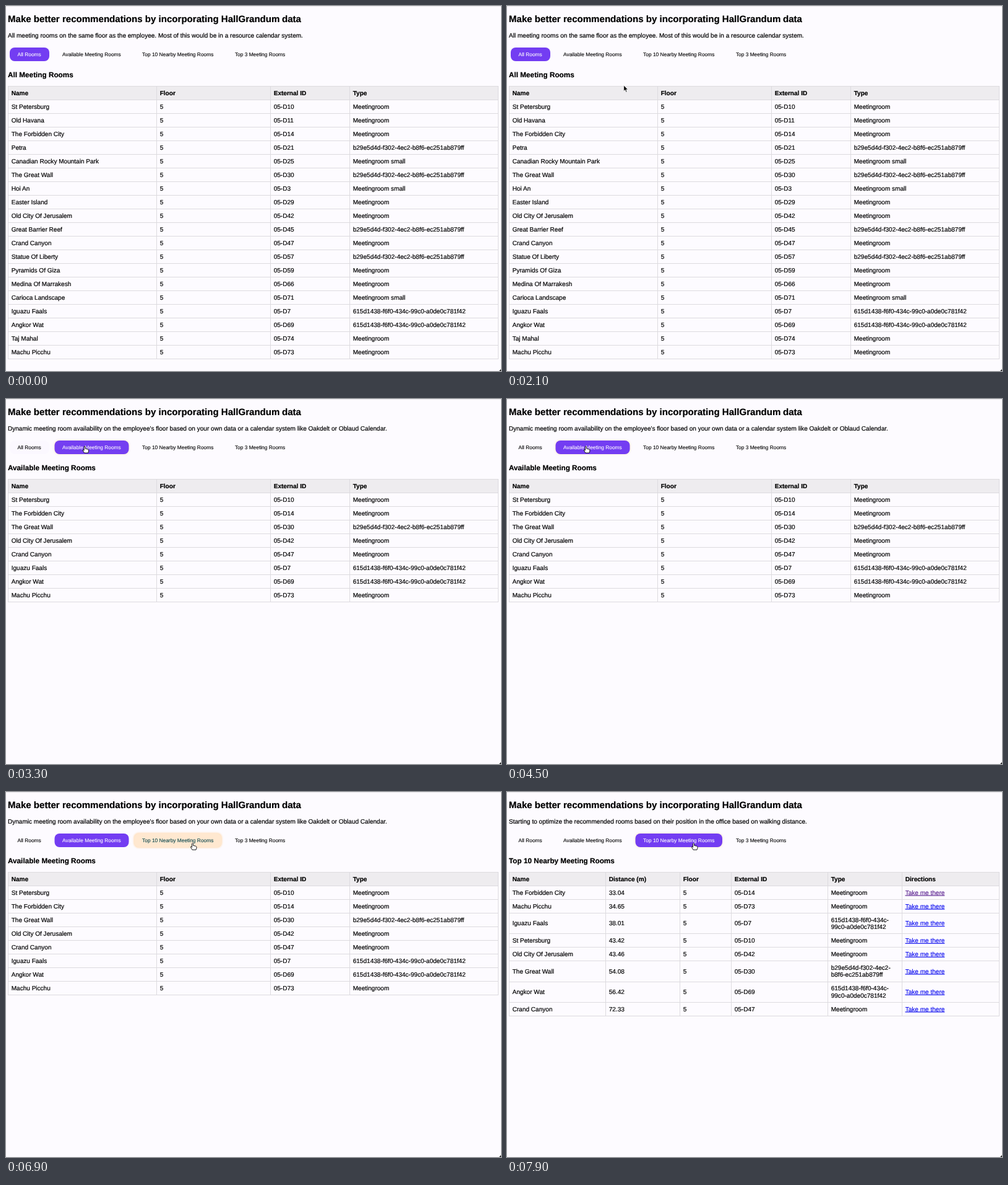
An HTML page for the animation above (8 s loop, 800 by 589 pixels).

```html
<!DOCTYPE html>
<html lang="en">
<head>
<meta charset="utf-8">
<title>Meeting rooms</title>
<style>
  html, body { margin: 0; width: 100%; height: 100%; overflow: hidden; background: #fdfbff; }
  svg { display: block; width: 100%; height: 100%; }
  text {
    font: 10.05px "Liberation Sans", Arial, sans-serif; text-rendering: geometricPrecision; white-space: pre;
    color: #000; fill: currentColor; stroke: currentColor; stroke-width: .2px;
  }
  .title { font-size: 15.07px; font-weight: bold; }
  .heading { font-size: 11.76px; font-weight: bold; }
  .tab { font-size: 8.37px; stroke-width: .12px; }
  .th { font-weight: bold; }
  .link { color: #0000ee; text-decoration: underline; stroke-width: .1px; }
  .visited { color: #551a8b; }
</style>
</head>
<body>
<svg id="stage" viewBox="0 0 800 589">
  <defs>
    <filter id="blur" x="-10%" y="-50%" width="120%" height="200%"><feGaussianBlur stdDeviation="1.6"/></filter>
  </defs>
  <rect width="800" height="589" fill="#fdfbff"/>
  <rect width="800" height="1" fill="#e9e7eb"/>
  <path d="M800 586V589H797Z" fill="#222"/>
  <text class="title" x="3" y="26.2">Make better recommendations by incorporating HallGrandum<tspan x="446">data</tspan></text>
</svg>
<script>
const LOOP = 8000, STEP = 100;
const stage = document.getElementById('stage');

function add(parent, tag, attrs, text) {
  const el = document.createElementNS('http://www.w3.org/2000/svg', tag);
  for (const key in attrs) el.setAttribute(key, attrs[key]);
  if (text !== undefined) el.textContent = text;
  parent.appendChild(el);
  return el;
}

const B = 'b29e5d4d-f302-4ec2-b8f6-ec251ab879ff';
const C = '615d1438-f6f0-434c-99c0-a0de0c781f42';
const M = 'Meetingroom', S = 'Meetingroom small';
const rooms = [
  ['St Petersburg', 'D10', M], ['Old Havana', 'D11', M], ['The Forbidden City', 'D14', M],
  ['Petra', 'D21', B], ['Canadian Rocky Mountain Park', 'D25', S], ['The Great Wall', 'D30', B],
  ['Hoi An', 'D3', S], ['Easter Island', 'D29', M], ['Old City Of Jerusalem', 'D42', M],
  ['Great Barrier Reef', 'D45', B], ['Crand Canyon', 'D47', M], ['Statue Of Liberty', 'D57', B],
  ['Pyramids Of Giza', 'D59', M], ['Medina Of Marrakesh', 'D66', M], ['Carioca Landscape', 'D71', S],
  ['Iguazu Faals', 'D7', C], ['Angkor Wat', 'D69', C], ['Taj Mahal', 'D74', M], ['Machu Picchu', 'D73', M]
];
const byId = id => rooms.find(room => room[1] === id);
const plainRow = ([name, id, type]) => [name, '5', '05-' + id, type];
const available = ['D10', 'D14', 'D30', 'D42', 'D47', 'D7', 'D69', 'D73'].map(byId);

// Long identifiers wrap after their third group in the narrow column.
const wrap = type => type.length > 20 ? [type.slice(0, 19), type.slice(19)] : type;
const nearby = [
  ['D14', '33.04'], ['D73', '34.65'], ['D7', '38.01'], ['D10', '43.42'],
  ['D42', '43.46'], ['D30', '54.08'], ['D69', '56.42'], ['D47', '72.33']
].map(([id, distance]) => {
  const [name, , type] = byId(id);
  return [name, distance, '5', '05-' + id, wrap(type), 'Take me there'];
});

function page(intro, heading, columns, headers, rows) {
  const g = add(stage, 'g');
  add(g, 'text', { x: 3, y: 51.2 }, intro);
  add(g, 'text', { class: 'heading', x: 3, y: 114.8 }, heading);
  add(g, 'rect', { x: 3, y: 129, width: 793, height: 22, fill: '#eeecef' });
  let y = 129, lines = 'M3 129.5H796';
  [headers, ...rows].forEach((row, r) => {
    const height = row.some(Array.isArray) ? 33.3 : 22;
    row.forEach((cell, c) => {
      const parts = [].concat(cell);
      const link = r > 0 && headers[c] === 'Directions';
      const kind = !r ? 'th' : link ? (r === 1 ? 'link visited' : 'link') : '';
      parts.forEach((part, i) => add(g, 'text', {
        class: kind, x: columns[c] + 5.7,
        y: y + height / 2 + 3.6 + (i - (parts.length - 1) / 2) * 11.4
      }, part));
    });
    y += height;
    lines += `M3 ${Math.round(y) + .5}H796`;
  });
  for (const x of [...columns, 795]) lines += `M${x + .5} 129V${Math.round(y) + 1}`;
  add(g, 'path', { d: lines, stroke: '#dddbdf', fill: 'none' });
  return g;
}

const columns = [3, 243, 427, 555];
const headers = ['Name', 'Floor', 'External ID', 'Type'];
const pages = [
  page('All meeting rooms on the same floor as the employee. Most of this would be in a resource calendar system.',
    'All Meeting Rooms', columns, headers, rooms.map(plainRow)),
  page("Dynamic meeting room availability on the employee's floor based on your own data or a calendar system like Oakdelt or Oblaud Calendar.",
    'Available Meeting Rooms', columns, headers, available.map(plainRow)),
  page('Starting to optimize the recommended rooms based on their position in the office based on walking distance.',
    'Top 10 Nearby Meeting Rooms', [3, 159, 279, 362, 518, 638],
    ['Name', 'Distance (m)', 'Floor', 'External ID', 'Type', 'Directions'], nearby)
];

const FIRST = 3020, SECOND = 7320;
const tabs = [
  { label: 'All Rooms', x: 6, w: 64, on: -1e4, off: FIRST },
  { label: 'Available Meeting Rooms', x: 78.5, w: 120, on: FIRST, off: SECOND, enter: 2250, leave: 5430 },
  { label: 'Top 10 Nearby Meeting Rooms', x: 207.5, w: 140.5, on: SECOND, enter: 5460 },
  { label: 'Top 3 Meeting Rooms', x: 357.3, w: 107 }
];
for (const tab of tabs) {
  const box = { x: tab.x, y: 67, width: tab.w, height: 22, rx: 8 };
  tab.glow = add(stage, 'rect', { ...box, x: tab.x - 1, y: 66, width: tab.w + 2, height: 24, fill: '#ffdcb4', filter: 'url(#blur)' });
  tab.warm = add(stage, 'rect', { ...box, fill: '#ffe8d0' });
  tab.fill = add(stage, 'rect', { ...box, fill: '#733df2' });
  tab.text = add(stage, 'text', { class: 'tab', x: tab.x + 12.6, y: 81 }, tab.label);
}

const ring = add(stage, 'circle', { r: 18, fill: 'none', stroke: '#0b0b12', 'stroke-width': 2 });
const cursor = add(stage, 'g', { 'stroke-linejoin': 'round' });
const arrow = add(cursor, 'path', {
  d: 'M0 0V9.6L2.2 7.6L3.8 11.3L5.4 10.6L3.9 7H6.8Z', fill: '#000', stroke: '#fff', 'stroke-width': .8
});
const hand = add(cursor, 'path', {
  d: 'M-1 1Q0-1 1 1V4L5 5Q7 5.5 6.5 8L5.5 11H-.5L-3 7Q-3.5 5.4-2 6L-1 7Z', fill: '#fff', stroke: '#111', 'stroke-width': .95
});

const path = [
  [700, 707, 389], [800, 664, 398], [900, 664, 398], [1000, 664, 417], [1300, 353, 266],
  [1500, 322, 240], [1600, 322, 240], [2400, 127, 76], [5200, 127.5, 76],
  [5800, 284, 84], [6600, 301.5, 82.3], [8000, 301.5, 82.3]
];
const clicks = [[2800, 3100], [7000, 7300]];

const clamp = v => Math.max(0, Math.min(1, v));
const smooth = v => { v = clamp(v); return v * v * (3 - 2 * v); };
const ramp = (t, start, length) => start === undefined ? 0 : smooth((t - start) / length);
const mix = (a, b, k) => a.map((v, i) => v + (b[i] - v) * k);
const show = (el, visible) => el.setAttribute('visibility', visible ? 'inherit' : 'hidden');

function pointer(t) {
  const i = Math.max(1, path.findIndex(p => p[0] >= t));
  const a = path[i - 1], b = path[i];
  return mix(a.slice(1), b.slice(1), smooth((t - a[0]) / (b[0] - a[0])));
}

function draw(t) {
  const current = t < FIRST ? 0 : t < SECOND ? 1 : 2;
  pages.forEach((g, i) => show(g, i === current));

  for (const tab of tabs) {
    const active = ramp(t, tab.on, 300) - ramp(t, tab.off, 300);
    const hover = ramp(t, tab.enter, 250) - ramp(t, tab.leave, 250);
    tab.glow.setAttribute('opacity', hover * (1 - .6 * active));
    tab.warm.setAttribute('opacity', hover);
    tab.fill.setAttribute('opacity', active);
    const ink = mix(mix([0, 0, 0], [12, 72, 78], hover), [255, 255, 255], active);
    tab.text.style.color = `rgb(${ink.map(Math.round)})`;
  }

  const [x, y] = pointer(t);
  const over = tabs.some(tab => t >= tab.enter && !(t >= tab.leave));
  cursor.setAttribute('transform', `translate(${x} ${y})`);
  show(cursor, t >= path[0][0]);
  show(arrow, !over);
  show(hand, over);
  ring.setAttribute('cx', x + 1);
  ring.setAttribute('cy', y + .8);
  show(ring, clicks.some(([down, up]) => t >= down && t < up));
}

const start = performance.now();
function tick() {
  const t = (performance.now() - start) % LOOP;
  draw(Math.floor(t / STEP) * STEP);
  requestAnimationFrame(tick);
}
tick();
</script>
</body>
</html>
```
